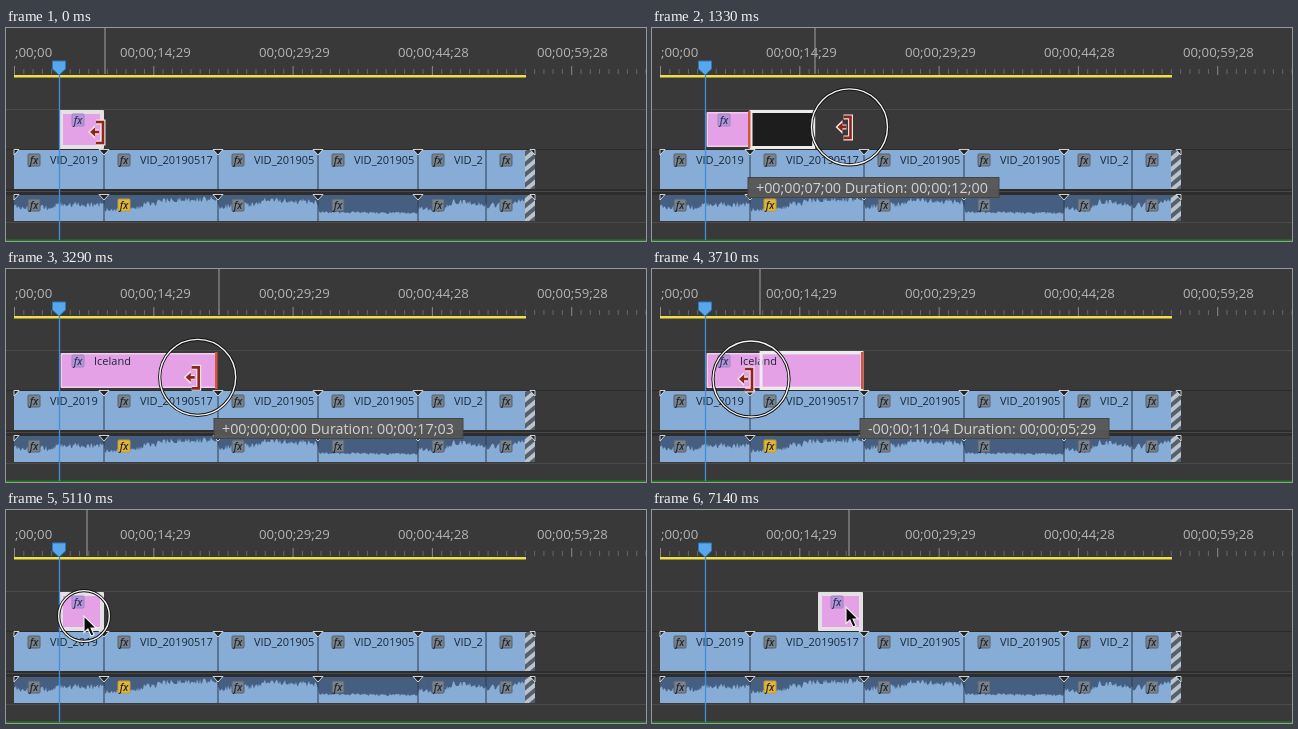
These frames come from a looping animation (640x213 px, 7280 ms). An HTML page:

```html
<!DOCTYPE html>
<html lang="en">
<head>
<meta charset="utf-8">
<title>Trimming and moving a clip</title>
<style>
  html, body { margin: 0; width: 100%; height: 100%; overflow: hidden; background: #393939; }
  svg { display: block; width: 640px; height: 213px; font-family: "Open Sans", "Noto Sans", sans-serif; }
  .time { font-size: 13.2px; fill: #b4b4b4; }
  .label { font-size: 11px; fill: #1b2836; }
  .fx { font-size: 10px; font-style: italic; font-weight: 600; text-anchor: middle; }
  .tip { font-size: 14.3px; fill: #d2d2d2; }
</style>
</head>
<body>
<svg viewBox="0 0 640 213">
  <defs>
    <pattern id="hatch" width="8" height="8" patternUnits="userSpaceOnUse" patternTransform="rotate(-40)">
      <rect width="8" height="8" fill="#55606c"/>
      <rect width="8" height="4" fill="#b9c4cf"/>
    </pattern>
  </defs>
  <g id="tracks"></g>
  <rect id="hover" y="0" width="1" height="46" fill="#a2a2a2"/>
  <g id="clip">
    <rect id="frame" rx="1"/>
    <rect id="body" fill="#e5a1e5"/>
    <g id="clipFx">
      <rect x="13" y="86" width="12" height="12" rx="1" fill="#b596d6" stroke="#a283c0"/>
      <text class="fx" x="19" y="95.5" fill="#3c3168">fx</text>
    </g>
    <text id="clipName" class="label" x="88" y="96" fill="#2b1a2b">Iceland</text>
  </g>
  <g id="trim">
    <rect id="grown" y="83.5" height="36" stroke="#ececec" stroke-width="3"/>
    <rect id="oldEdge" y="83" width="2.5" height="37" fill="#d4553c"/>
  </g>
  <g id="ghost">
    <rect x="0" y="82" width="45" height="39" fill="#8f6891"/>
    <rect x="45" y="83" width="2" height="38" fill="#1c1c1c"/>
    <text class="label" x="4" y="96" style="fill:#d3c3d4">Graphi</text>
  </g>
  <g id="snap">
    <path d="M0 50V211" stroke="#080808" stroke-width="1.3"/>
    <path d="M-5 121h10l-5 6zM-5 167h10l-5 6z" fill="#d5d5d5"/>
  </g>
  <path d="M53.5 46V212" stroke="#3f8fdc" stroke-width="1.3"/>
  <path d="M46.5 33h13v8l-6.5 6-6.5-6z" fill="#58a6ec" stroke="#2f78bd"/>
  <g id="tip">
    <rect id="tipBox" height="20" fill="#575757" fill-opacity=".96" stroke="#444"/>
    <text id="tipText" class="tip"></text>
  </g>
  <g id="ring" fill="none">
    <circle stroke="#111" stroke-width="3.2"/>
    <circle stroke="#f4f4f4" stroke-width="1.4"/>
  </g>
  <g id="trimCursor" stroke-linejoin="miter">
    <path d="M-6-10H1V11H-6M-3 0H-8" fill="none" stroke="#f3e4e0" stroke-width="5"/>
    <path d="M-14 0l7-7v14z" fill="#f3e4e0"/>
    <path d="M-6-10H1V11H-6M-3 0H-8" fill="none" stroke="#8d241e" stroke-width="2.6"/>
    <path d="M-12 0l5-4.5v9z" fill="#8d241e"/>
  </g>
  <g id="arrow">
    <path d="M0 0V16.500L3.900 13L7 20L10 18.700L7 12H12.200Z" fill="#0b0b0b" stroke="#f2f2f2" stroke-width="1.1"/>
    <g id="dropIcon">
      <path d="M8 12h5v12H8zM25 12h5v12h-5z" fill="#222" stroke="#eee"/>
      <path d="M15 8h8v5h4l-8 8-8-8h4z" fill="#4da3e6" stroke="#153e63"/>
    </g>
  </g>
</svg>
<script>
const LOOP = 7280, STEP = 70, LAG = 105;
const IN = 53, SHORT = 98, LONG = 211;
const FRAMES_PER_PX = 3.248;
const $ = id => document.getElementById(id);
const set = (el, attrs) => { for (const k in attrs) el.setAttribute(k, attrs[k]); };
const show = (el, on) => el.setAttribute('visibility', on ? 'visible' : 'hidden');
const move = (el, x, y = 0) => el.setAttribute('transform', `translate(${x} ${y})`);
const box = (x, y, w, h, fill, more = '') =>
  `<rect x="${x}" y="${y}" width="${w}" height="${h}" fill="${fill}" ${more}/>`;

// Static timeline

const cuts = [8, 98, 212, 312, 412, 480, 519];
const names = ['VID_2019', 'VID_20190517', 'VID_201905', 'VID_201905', 'VID_2', ''];
const level = [[8, 179], [45, 180], [52, 176], [98, 177], [99, 182], [128, 181], [140, 176],
  [165, 172], [211, 171], [213, 179], [245, 177], [260, 172], [311, 174], [313, 184],
  [411, 185], [413, 180], [438, 181], [448, 173], [479, 177], [482, 179], [500, 174], [519, 173]];

function mix(points, x) {
  let i = 1;
  while (i < points.length - 1 && points[i][0] < x) i++;
  const [a, b] = [points[i - 1], points[i]];
  return a[1] + (b[1] - a[1]) * Math.min(1, (x - a[0]) / (b[0] - a[0]));
}

function noise(n) {
  const v = Math.sin(n * 127.1) * 43758.5453;
  return v - Math.floor(v);
}

function wave() {
  let d = 'M8 193';
  for (let x = 8; x <= 519; x++) {
    const rough = x > 312 && x < 412 ? 2.5 : 6;
    const y = mix(level, x) + (noise(x) - 0.5) * rough;
    d += `L${x} ${Math.max(168, y).toFixed(1)}`;
  }
  return `<path d="${d}V193Z" fill="#87add7"/>`;
}

function badge(x, y, gold) {
  return box(x - 6, y - 6, 12, 12, gold ? '#e3b636' : '#78838e', `rx="1" stroke="${gold ? '#c29a2c' : '#56616d'}"`) +
    `<text class="fx" x="${x}" y="${y + 3.5}" fill="#20272e">fx</text>`;
}

function notch(x, y) {
  return `<path d="M${x - 5} ${y}h10l-5 5.500z" fill="#222" stroke="#dfe6ec" stroke-width=".9"/>`;
}

function tracks() {
  let s = box(0, 81, 640, 1, '#4a4a4a') + box(0, 121, 640, 1, '#2c2c2c') +
    box(0, 161, 640, 6, '#2d2d2d') + box(0, 163, 640, 1, '#484848') +
    box(0, 194, 640, 1, '#4a4a4a') + box(0, 211.500, 640, 1.500, '#1f7a1c');
  for (let i = 0; i <= 68; i++) {
    const tall = i % 15 === 0;
    s += box((8 + i * 9.287).toFixed(1), tall ? 38 : 41, 1, tall ? 9 : 5, tall ? '#8a8a8a' : '#686868');
  }
  s += box(8, 47, 512, 2.5, '#efe04a');
  [[9, ';00;00'], [114, '00;00;14;29'], [253, '00;00;29;29'], [392, '00;00;44;28'], [531, '00;00;59;28']]
    .forEach(([x, label]) => s += `<text class="time" x="${x}" y="29">${label}</text>`);
  s += box(8, 122, 511, 39, '#87add7') + box(8, 167, 511, 26, '#465f80') + wave();
  s += box(519, 122, 10, 39, 'url(#hatch)') + box(519, 167, 10, 26, 'url(#hatch)');
  names.forEach((name, i) => {
    const x = cuts[i] + 20;
    s += badge(x, 132) + badge(x, 177, i === 1) +
      `<text class="label" x="${x + 16}" y="136">${name}</text>`;
    if (i) s += box(cuts[i] - 0.5, 122, 1, 39, '#2c3d50') + box(cuts[i] - 0.5, 167, 1, 26, '#2c3d50');
    if (i && i < 5) s += notch(cuts[i], 121.500) + notch(cuts[i], 166.500);
  });
  for (const y of [121.5, 166.5]) {
    s += `<path d="M8 ${y}h5l-5 5.500zM529 ${y}h-5l5 5.500z" fill="#222" stroke="#dfe6ec" stroke-width=".9"/>`;
  }
  return s;
}
$('tracks').innerHTML = tracks();

// Motion

// time, x, y, and 1 for a linear approach
const path = [
  [0, 96, 104], [990, 96, 104], [1440, 215.4, 98], [1820, 213, 99], [2310, 140, 103],
  [2520, 142, 103], [2870, 210, 107], [3150, 211, 108], [3680, 99, 110], [4000, 99, 110],
  [4600, 78, 106], [5250, 78, 106], [5700, 166.6, 101], [6000, 194, 99, 1], [6300, 194, 97], [LOOP, 194, 97]
];
const presses = [[630, 1750], [2940, 3920], [4970, 6250]];
const drags = [[990, 1750], [3150, 3920], [5250, 6250]];

function pointer(t) {
  t = Math.max(0, t);
  let i = 1;
  while (path[i][0] < t) i++;
  const [a, b] = [path[i - 1], path[i]];
  let u = (t - a[0]) / (b[0] - a[0]);
  if (!b[3]) u = u * u * (3 - 2 * u);
  return [a[1] + (b[1] - a[1]) * u, a[2] + (b[2] - a[2]) * u];
}

function ringSize(t) {
  for (const [down, up] of presses) {
    if (t > down && t < up + 210) return 38 * Math.min(1, (t - down) / 210, (up + 210 - t) / 210);
  }
  return 0;
}

function timecode(frames) {
  const pad = n => String(n).padStart(2, '0');
  const n = Math.abs(frames);
  return `00;00;${pad(Math.floor(n / 30))};${pad(n % 30)}`;
}
const signed = n => (n < 0 ? '-' : '+') + timecode(n);
const snapTo = (x, ...stops) => stops.find(s => Math.abs(s - x) < 10) ?? x;

function drawClip(x, end, thin) {
  const y = thin ? 84 : 82, h = thin ? 35 : 39, pad = thin ? 1.5 : 4;
  const left = thin ? x + 1.5 : x;
  set($('frame'), { x: left, y, width: end - left, height: h, fill: thin ? '#f0cfee' : '#e4e1e4' });
  set($('body'), { x: left + pad, y: y + pad, width: end - left - 2 * pad, height: h - 2 * pad });
  move($('clipFx'), x);
  show($('clipName'), end - x > 100);
}

function drawTip(x, y, w, text) {
  set($('tipBox'), { x, y, width: w });
  set($('tipText'), { x: x + 8, y: y + 15 });
  $('tipText').textContent = text;
}

function draw(t) {
  const [x, y] = pointer(t);
  const hover = pointer(t - LAG)[0] + 3;
  const drag = drags.findIndex(([a, b]) => t >= a && t < b);
  const trimming = drag === 0 || drag === 1;
  const moved = t >= drags[2][1];
  const start = moved ? LONG - SHORT + IN : IN;
  const end = moved || (t >= drags[0][1] && t < drags[1][1]) ? LONG : SHORT;

  set($('hover'), { x: Math.round(hover) - 0.5 });
  drawClip(start, end, trimming);
  show($('trim'), trimming);
  show($('ghost'), drag === 2);
  show($('tip'), drag >= 0);

  let snapped = 0;
  if (trimming) {
    const edge = snapTo(hover, SHORT, LONG);
    const delta = Math.round((edge - end) * FRAMES_PER_PX);
    const from = Math.min(edge, end), to = Math.max(edge, end);
    set($('grown'), { x: from + 1, width: Math.max(0, to - from - 2), fill: drag ? 'none' : '#1d1d1d' });
    set($('oldEdge'), { x: end - 2 });
    drawTip(drag ? 208 : 96, 149.500, drag ? 249 : 251,
      `${signed(delta)} Duration: ${timecode((drag ? 513 : 150) + delta)}`);
    if (edge !== hover && edge !== end) snapped = edge + 0.5;
  } else if (drag === 2) {
    const tail = snapTo(SHORT + hover - 81, LONG);
    move($('ghost'), IN + tail - SHORT);
    drawTip(79, 135.500, 105, signed(Math.round((tail - SHORT) * FRAMES_PER_PX)));
    if (tail === LONG) snapped = LONG + 0.5;
  }
  show($('snap'), snapped);
  move($('snap'), snapped);

  const r = ringSize(t);
  show($('ring'), r);
  move($('ring'), x, y);
  for (const c of $('ring').children) set(c, { r });

  const bracket = trimming || (drag < 0 && Math.abs(x - end) < 10);
  show($('trimCursor'), bracket);
  show($('arrow'), !bracket);
  show($('dropIcon'), drag === 2);
  move($('trimCursor'), x, y);
  move($('arrow'), x, y - (drag === 2 ? 2 : 0));
}

function tick() {
  const t = performance.now() % LOOP;
  draw(Math.floor(t / STEP) * STEP);
  requestAnimationFrame(tick);
}
tick();
</script>
</body>
</html>
```
